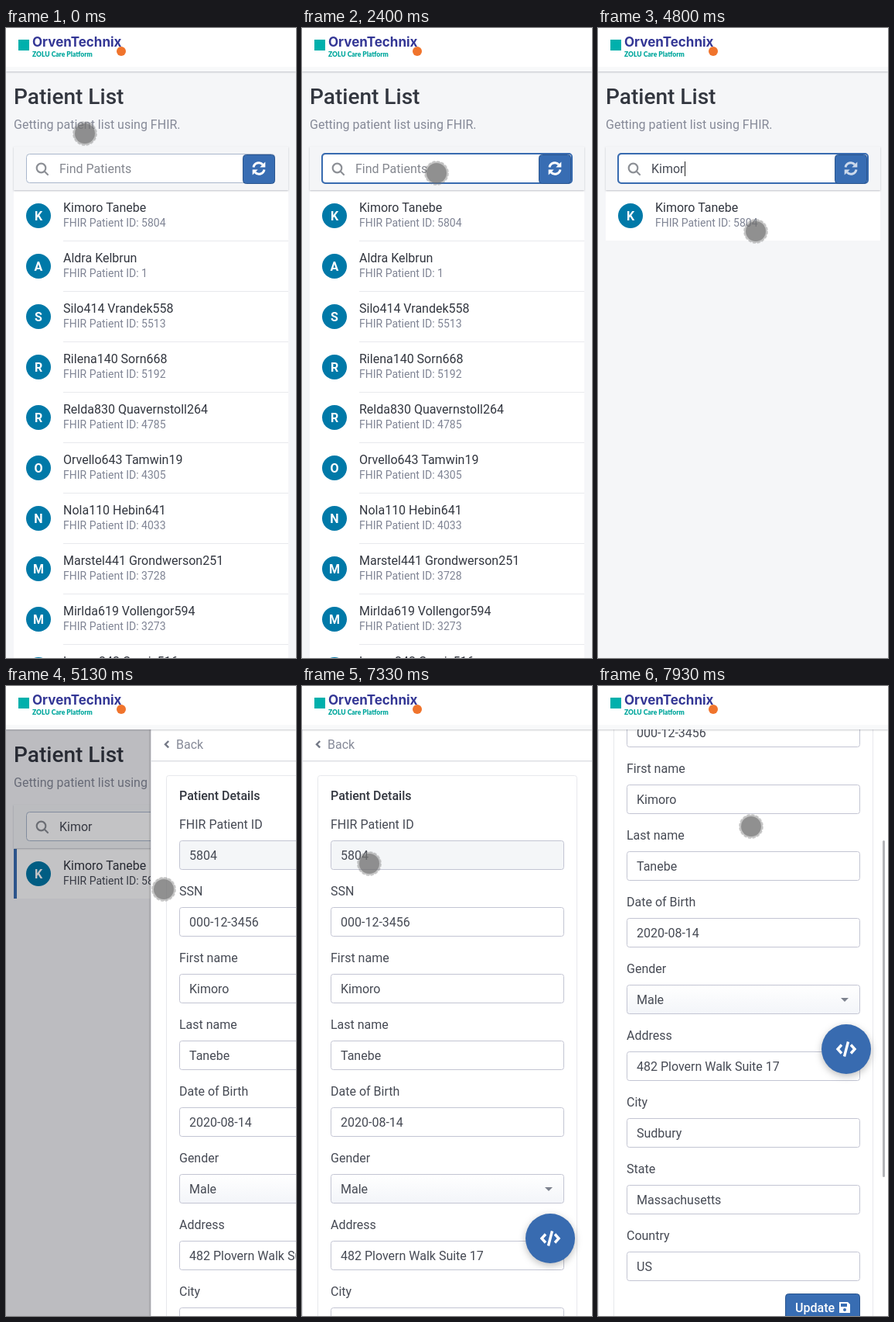
An HTML page that plays this animation: 375x812 px, repeating every 8000 ms.

```html
<!DOCTYPE html>
<html lang="en">
<head>
<meta charset="utf-8">
<title>Patient List</title>
<style>
  html, body { margin: 0; width: 100%; height: 100%; overflow: hidden; background: #f5f6f8; }
  svg { display: block; width: 375px; height: 812px; }
  text { font-family: Roboto, "Open Sans", sans-serif; white-space: pre; }
  .brand { font-family: Inter, sans-serif; }
  .tag { font-family: Lato, sans-serif; }
  .soft { filter: drop-shadow(0 1px 1px rgba(40, 45, 60, .25)); }
  .lift { filter: drop-shadow(0 3px 5px rgba(0, 0, 0, .26)); }
</style>
</head>
<body>
<svg id="stage" viewBox="0 0 375 812" xmlns="http://www.w3.org/2000/svg"></svg>
<script>
const INK = '#32363f', GREY = '#868a98', BLUE = '#386db3', LOOP = 8000, FRAME = 200 / 3;

const text = (x, y, str, size = 16, fill = INK, weight = 400, more = '') =>
  `<text x="${x}" y="${y}" font-size="${size}" fill="${fill}" font-weight="${weight}" ${more}>${str}</text>`;
const rect = (x, y, w, h, fill, more = '') =>
  `<rect x="${x}" y="${y}" width="${w}" height="${h}" fill="${fill}" ${more}/>`;
const box = (x, y, w, h, fill, stroke, r = 3) =>
  rect(x + .5, y + .5, w - 1, h - 1, fill, `stroke="${stroke}" rx="${r}"`);

const people = [
  ['Kimoro Tanebe', 5804], ['Aldra Kelbrun', 1], ['Silo414 Vrandek558', 5513],
  ['Rilena140 Sorn668', 5192], ['Relda830 Quavernstoll264', 4785],
  ['Orvello643 Tamwin19', 4305], ['Nola110 Hebin641', 4033],
  ['Marstel441 Grondwerson251', 3728], ['Mirlda619 Vollengor594', 3273],
  ['Lomar242 Corvix516', 3120]
];
const shortList = [...people.slice(0, 3), ['Joki212 Brelt904', 2871], ['Hekla87 Dorn613', 2406]];

const row = ([name, id], i, all) => {
  const y = 210 + i * 65;
  return rect(10, y, 355, i < all.length - 1 ? 65 : 64, '#fff') +
    (i < all.length - 1 ? rect(74, y + 64, 291, 1, '#e8e9ed') : '') +
    `<circle cx="42" cy="${y + 32}" r="16" fill="#0079a8"/>` +
    text(42, y + 37.5, name[0], 16, '#fff', 700, 'text-anchor="middle"') +
    text(74, y + 27, name) +
    text(74, y + 46, 'FHIR Patient ID: ' + id, 14, '#7f8494', 400, i ? '' : 'class="id"');
};
const list = (id, items) => `<g id="${id}">${items.map(row).join('')}</g>`;

const arrow = '<path d="M-7 -1.5A7 7 0 0 1 5 -5" fill="none" stroke="#fff" stroke-width="3"/>' +
  '<path d="M8.3 -8.5V-1.5H1.3Z" fill="#fff"/>';

const page =
  rect(0, 0, 375, 812, '#f5f6f8') +
  text(10, 98, 'Patient List', 28, INK, 500) +
  text(10, 130, 'Getting patient list using FHIR.', 16, GREY) +
  list('all', people) + list('some', shortList) + list('one', people.slice(0, 1)) +
  `<g id="mark">${rect(10, 210, 4, 64, BLUE)}</g>` +
  rect(10, 153, 355, 56, '#f4f5f7', 'class="soft"') +
  box(26, 162, 322, 38, '#fff', '#a9b7cc', 4) +
  '<rect id="focus" x="26" y="162" width="323" height="38" rx="4" fill="none" stroke="#386bb0" stroke-width="2"/>' +
  `<g fill="none" stroke="#8d9096" stroke-width="2.2" stroke-linecap="round">
    <circle cx="45.5" cy="180.5" r="5.8"/><path d="M50 185L54 189"/></g>` +
  text(69, 187, 'Find Patients', 16, '#84878f', 400, 'id="hint"') +
  text(69, 187, '', 16, '#464a54', 400, 'id="typed"') +
  rect(69, 172, 1, 19, '#222', 'id="caret"') +
  box(306, 163, 42, 38, BLUE, '#2b568f', 4) +
  `<g id="sync" transform="translate(327 181)">${arrow}<g transform="rotate(180)">${arrow}</g></g>`;

const fields = [
  ['FHIR Patient ID', '5804'], ['SSN', '000-12-3456'], ['First name', 'Kimoro'],
  ['Last name', 'Tanebe'], ['Date of Birth', '2020-08-14'], ['Gender', 'Male'],
  ['Address', '482 Plovern Walk Suite 17'], ['City', 'Sudbury'],
  ['State', 'Massachusetts'], ['Country', 'US']
];
const field = ([label, value], i) => {
  const y = 199 + i * 86;
  const fill = i === 0 ? '#f4f6f8' : i === 5 ? 'url(#shade)' : '#fff';
  return text(37, y - 15, label, 16, '#464a54') + box(37, y, 302, 38, fill, '#c3c5d3') +
    text(50, y + 25, value, 16, '#464a54') +
    (i === 5 ? `<path d="M314 ${y + 17}h10l-5 5z" fill="#7d828e"/>` : '');
};

const panel =
  rect(0, 56, 375, 756, '#fff', 'style="filter:drop-shadow(-1px 0 1px rgba(0,0,0,.2))"') +
  `<g id="scroll">
    <path d="M23.2 71L19 75.2L23.2 79.4" fill="none" stroke="#747987" stroke-width="2.4"/>` +
  text(33, 81, 'Back', 16, GREY) +
  rect(0, 96, 375, 1, '#dcdee3') + rect(0, 97, 375, 1, '#f1f2f4') +
  rect(20.5, 115.5, 335, 966, '#fff', 'rx="3" stroke="#e7e8ec"') +
  text(37, 147, 'Patient Details', 16, INK, 500) +
  fields.map(field).join('') +
  box(242, 1027, 97, 38, BLUE, '#2b568f', 4) +
  text(255, 1051, 'Update', 16, '#fff', 500) +
  `<path d="M312 1038h11l3 3v11h-14z" fill="#fff"/>
   <path d="M314 1040h8v4h-8z" fill="${BLUE}"/><circle cx="319" cy="1048" r="2" fill="${BLUE}"/>
   <circle class="lift" cx="321" cy="712" r="32" fill="#386bb0"/>
   <path d="M315 706.5L310 712L315 717.5M327 706.5L332 712L327 717.5M323.5 702.5L318.5 721.5"
     fill="none" stroke="#fff" stroke-width="3.4"/></g>` +
  rect(0, 56, 1, 756, '#dfe0e5') +
  rect(368, 60, 3, 434, '#b3b4b8', 'id="bar" rx="1.5"');

const header =
  `<g class="soft">${rect(0, 0, 375, 56, '#f8f9fa')}</g>` + rect(0, 0, 375, 50, '#fff') +
  rect(16, 15, 14, 14, '#00b0ac') +
  text(34, 24, 'OrvenTechnix', 17, '#333695', 700, 'class="brand"') +
  text(34, 36.5, 'ZOLU Care Platform', 8.5, '#00a79d', 900, 'class="tag"') +
  '<circle cx="149" cy="30" r="6" fill="#f0742c"/>';

const pointer = `<g id="pointer">
  <circle r="15" fill="#777" opacity=".42"/>
  <circle r="15.3" fill="none" stroke="#777" stroke-width="1.4" stroke-dasharray="4 2" opacity=".3"/>
  <circle r="13" fill="#6c6c6c" opacity=".6"/></g>`;

document.getElementById('stage').innerHTML =
  `<defs><linearGradient id="shade" x2="0" y2="1">
    <stop stop-color="#fff"/><stop offset="1" stop-color="#f3f5f9"/></linearGradient></defs>` +
  page + rect(0, 56, 375, 756, '#05080e', 'id="dim"') + `<g id="panel">${panel}</g>` + header + pointer;

const $ = id => document.getElementById(id);
const show = (id, on) => $(id).setAttribute('visibility', on ? 'visible' : 'hidden');
const move = (id, x, y) => $(id).setAttribute('transform', `translate(${x} ${y})`);
const clamp = v => Math.max(0, Math.min(1, v));

// Eased value between [time, ...values] steps
function track(keys, t) {
  const i = keys.findIndex(k => k[0] > t);
  if (i < 0) return keys[keys.length - 1].slice(1);
  if (i === 0) return keys[0].slice(1);
  const a = keys[i - 1], b = keys[i], p = (t - a[0]) / (b[0] - a[0]), e = p * p * (3 - 2 * p);
  return a.slice(1).map((v, n) => v + (b[n + 1] - v) * e);
}

const path = [
  [0, 102, 136], [533, 156, 211], [600, 156, 211], [667, 164, 202], [733, 168, 205],
  [933, 168, 205], [1267, 174, 187], [2600, 174, 187], [2667, 175, 188], [2867, 175, 188],
  [2933, 174, 187], [4267, 174, 187], [4333, 174, 196], [4400, 174, 196], [4467, 186, 210],
  [4533, 198, 223], [4667, 198, 223], [4733, 201, 245], [4800, 204, 262], [5400, 204, 262],
  [5667, 204, 265], [6000, 222, 340], [6200, 222, 340], [6667, 63, 79], [7267, 63, 79],
  [7333, 87, 229], [7600, 198, 181]
];
const slide = [[5000, 375], [5067, 330], [5133, 187], [5200, 50], [5267, 0]];
const strokes = [2866, 3066, 3200, 3333, 3466];
const scrolling = [[7340, 0], [7400, 6], [7667, 110], [7933, 244]];

function draw(now) {
  // Motion advances 15 times per second
  const t = Math.floor((now + 4) / FRAME) * FRAME;
  const open = t >= 5066;

  move('pointer', ...track(path, t));

  const typed = 'Kimor'.slice(0, strokes.filter(s => t >= s).length);
  $('typed').textContent = typed;
  show('hint', !typed);
  $('caret').setAttribute('x', typed ? Math.round(69 + $('typed').getComputedTextLength()) : 69);
  show('caret', !open && ((t >= 1866 && t < 2399) || (t >= 2866 && t < 3933) || t >= 4466));

  const level = t < 2933 ? 'all' : t < 3200 ? 'some' : 'one';
  for (const id of ['all', 'some', 'one']) show(id, id === level);
  $('focus').setAttribute('opacity', open ? 0 : clamp((t - 1816) / 250));
  $('sync').setAttribute('opacity', t >= 2933 ? .75 : 1);
  show('mark', open);
  document.querySelector('#one .id').setAttribute('fill', open ? '#464a54' : '#7f8494');

  const [x] = track(slide, t), [top] = track(scrolling, t);
  $('dim').setAttribute('opacity', .24 * clamp((t - 5000) / 133));
  show('panel', open);
  show('dim', open);
  move('panel', x, 0);
  move('scroll', 0, -top);
  $('bar').setAttribute('opacity', top > 0 ? 1 : clamp((5650 - t) / 200));
  $('bar').setAttribute('y', 60 + top * .57);
}

const start = performance.now();
function tick() {
  draw((performance.now() - start) % LOOP);
  requestAnimationFrame(tick);
}
tick();
</script>
</body>
</html>
```
